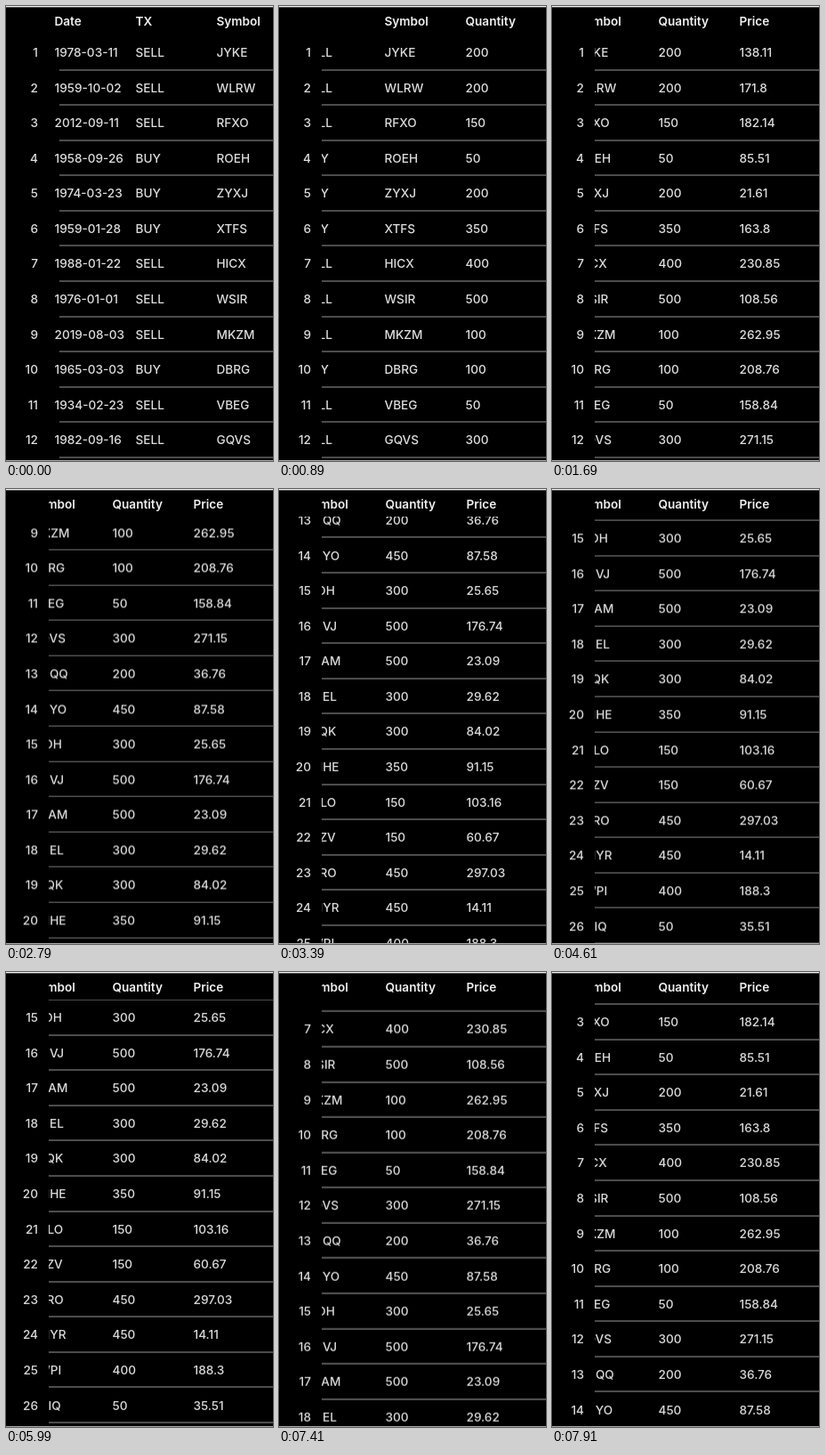
Animation, 300 px wide and 511 px high, one loop 8000 ms. Source, as an HTML page:

```html
<!DOCTYPE html>
<html lang="en">
<head>
<meta charset="utf-8">
<title>Scrolling table</title>
<style>
  html, body { margin: 0; width: 100%; height: 100%; overflow: hidden; background: #000; }
  #stage {
    position: relative; width: 300px; height: 511px; overflow: hidden;
    background: #000; color: #dedede;
    font: 450 13.6px/20px Inter, Roboto, sans-serif; white-space: nowrap;
  }
  #stage div, #stage span { position: absolute; }
  .pane { overflow: hidden; }
  #head { left: 48px; top: 2px; width: 252px; height: 29px; font-weight: 600; color: #f0f0f0; }
  #body { left: 48px; top: 31px; width: 252px; height: 479px; }
  #nums { left: 0; top: 31px; width: 48px; height: 479px; }
  .layer { left: 0; top: 0; will-change: transform; }
  .num { left: 0; width: 36px; text-align: right; }
  .rule { left: 12px; width: 449px; height: 2px; background: #4c4c4c; }
  .edge { left: 0; width: 300px; }
  .top { top: 0; height: 2px; background: linear-gradient(#f0f0f0 50%, #505050 50%); }
  .bottom { bottom: 0; height: 1px; background: #a8a8a8; }
</style>
</head>
<body>
<div id="stage">
  <div id="head" class="pane"><div class="layer"></div></div>
  <div id="body" class="pane"><div class="layer"></div></div>
  <div id="nums" class="pane"><div class="layer"></div></div>
  <div class="edge top"></div>
  <div class="edge bottom"></div>
</div>
<script>
const LOOP = 8000, PITCH = 39.58, COL = 91, TAU = 455, END = 555.1;
const HEADS = ["Date", "TX", "Symbol", "Quantity", "Price"];
const ROWS = `1978-03-11 SELL JYKE 200 138.11
1959-10-02 SELL WLRW 200 171.8
2012-09-11 SELL RFXO 150 182.14
1958-09-26 BUY ROEH 50 85.51
1974-03-23 BUY ZYXJ 200 21.61
1959-01-28 BUY XTFS 350 163.8
1988-01-22 SELL HICX 400 230.85
1976-01-01 SELL WSIR 500 108.56
2019-08-03 SELL MKZM 100 262.95
1965-03-03 BUY DBRG 100 208.76
1934-02-23 SELL VBEG 50 158.84
1982-09-16 SELL GQVS 300 271.15
1961-05-14 BUY HNQQ 200 36.76
1993-07-08 SELL NUYO 450 87.58
1948-12-30 BUY IUOH 300 25.65
2004-02-17 BUY NHVJ 500 176.74
1972-06-25 SELL DBAM 500 23.09
1985-10-06 SELL GNEL 300 29.62
1939-04-19 BUY SLQK 300 84.02
1996-08-27 SELL ONHE 350 91.15
1953-01-12 BUY KPLO 150 103.16
2008-11-05 BUY FTZV 150 60.67
1967-09-21 SELL EPRO 450 297.03
1981-03-02 BUY QNYR 450 14.11
1944-07-16 SELL LWPI 400 188.3
1999-05-29 BUY HBIQ 50 35.51`.split("\n").map(line => line.split(" "));

const layerOf = id => document.querySelector(`#${id} .layer`);
const head = layerOf("head"), body = layerOf("body"), nums = layerOf("nums");

function put(parent, tag, cls, text, top, left) {
  const el = document.createElement(tag);
  el.className = cls;
  el.textContent = text;
  el.style.top = top + "px";
  if (left !== undefined) el.style.left = left + "px";
  parent.append(el);
}

const colX = i => 6.5 + i * COL;
HEADS.forEach((text, i) => put(head, "span", "", text, 5, colX(i)));
ROWS.forEach((row, n) => {
  const top = 11 + n * PITCH;
  put(nums, "span", "num", n + 1, top);
  row.forEach((text, i) => put(body, "span", "", text, top, colX(i)));
  put(body, "div", "rule", "", top + 28.5);
});

// Sideways drag, then a vertical fling down and one back up: [time, offset]
const sideKeys = [[0, 0]];
[8, 40, 82, 118, 146, 167, 182, 192, 199, 204, 207, 208]
  .forEach((x, i) => sideKeys.push([590 + i * 100, x]));

const downKeys = [[0, 0], [2390, 20], [2490, 92], [2590, 182], [2690, 260]];
const glideDown = t => END - 235.5 * Math.exp((2790 - t) / TAU);
for (let t = 2790; t < 3900; t += 100) downKeys.push([t, glideDown(t)]);
for (let t = 4010; t < 4800; t += 100) downKeys.push([t, glideDown(t)]);
downKeys.push([4810, END]);

const upKeys = [[6980, 548], [7110, 468], [7210, 364], [7310, 285]];
for (let t = 7410; t < LOOP; t += 100) upKeys.push([t, 225.3 * Math.exp((7410 - t) / TAU)]);
const scrollKeys = downKeys.concat(upKeys);

function held(keys, t) {
  let value = keys[0][1];
  for (const [start, v] of keys) {
    if (start > t) break;
    value = v;
  }
  return value;
}

function draw(now) {
  const t = now % LOOP;
  const x = -held(sideKeys, t), y = -held(scrollKeys, t);
  head.style.transform = `translate(${x}px, 0)`;
  body.style.transform = `translate(${x}px, ${y}px)`;
  nums.style.transform = `translate(0, ${y}px)`;
}

const begin = performance.now();
function tick() {
  draw(performance.now() - begin);
  requestAnimationFrame(tick);
}
tick();
</script>
</body>
</html>
```
